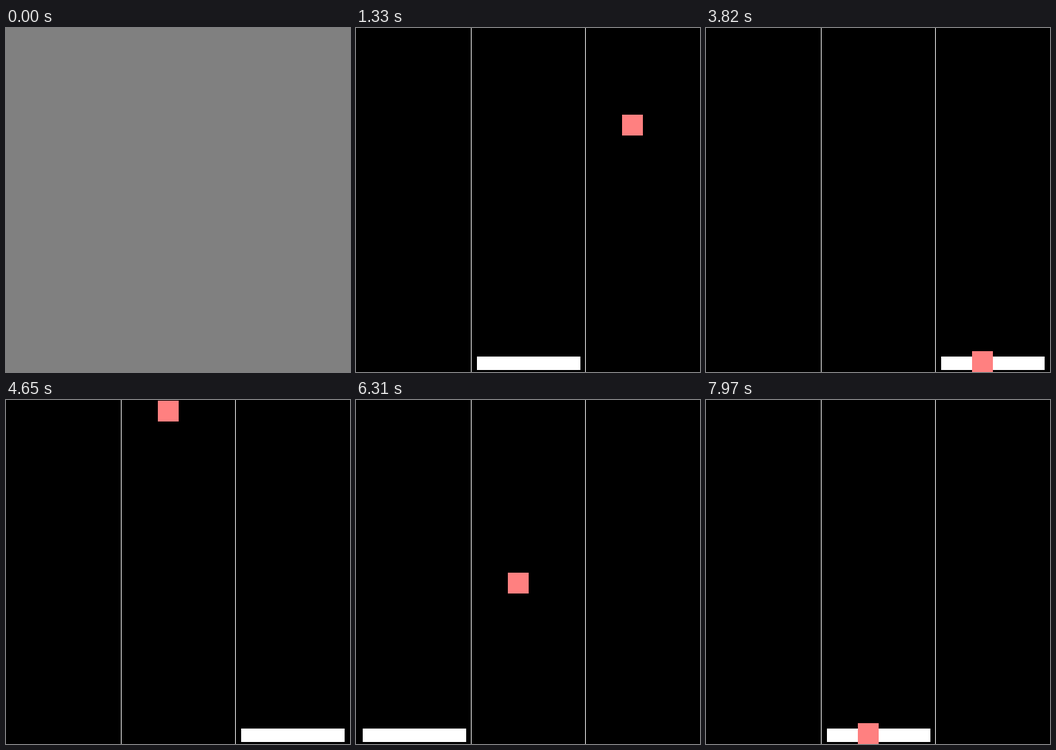
Write an HTML page with a canvas that moves like this. It is 512 by 512 pixels and loops after 8 s.

```html
<!DOCTYPE html>
<html lang="en">
<head>
<meta charset="utf-8">
<title>Three lanes</title>
<style>
  html, body { margin: 0; width: 100%; height: 100%; overflow: hidden; background: #000; }
  canvas { display: block; }
</style>
</head>
<body>
<canvas id="stage" width="512" height="512"></canvas>
<script>
const ctx = document.getElementById('stage').getContext('2d');
const SIZE = 512, LANE = 170, BLOCK = 31, ROW = 128;
const LOOP = 8000, INTRO = 500, STEP = 830, STEPS_PER_FALL = 5;

function rect(color, x, y, w, h) {
  ctx.fillStyle = color;
  ctx.fillRect(x, y, w, h);
}

// Each fall takes five steps: first in the right lane, then in the middle one.
function drawBlock(step) {
  const lane = 2 - Math.floor(step / STEPS_PER_FALL);
  const top = Math.min(1 + (step % STEPS_PER_FALL) * ROW, SIZE - BLOCK);
  rect('#ff8080', 56 + lane * LANE, top, BLOCK, BLOCK);
}

// The paddle walks to the right lane, waits, then swings left and turns back.
function drawPaddle(step) {
  const lane = Math.min(step, 2, Math.floor(Math.abs(step - 7.5)));
  rect('#fff', 10 + lane * LANE, 489, 154, 20);
}

function draw(time) {
  if (time < INTRO) {
    rect('#808080', 0, 0, SIZE, SIZE);
    return;
  }
  const step = Math.floor((time - INTRO) / STEP);
  rect('#000', 0, 0, SIZE, SIZE);
  for (const i of [1, 2]) rect('#fff', 1 + i * LANE, 0, 1, SIZE);
  drawPaddle(step);
  drawBlock(step);
}

function tick() {
  draw(performance.now() % LOOP);
  requestAnimationFrame(tick);
}
tick();
</script>
</body>
</html>
```
